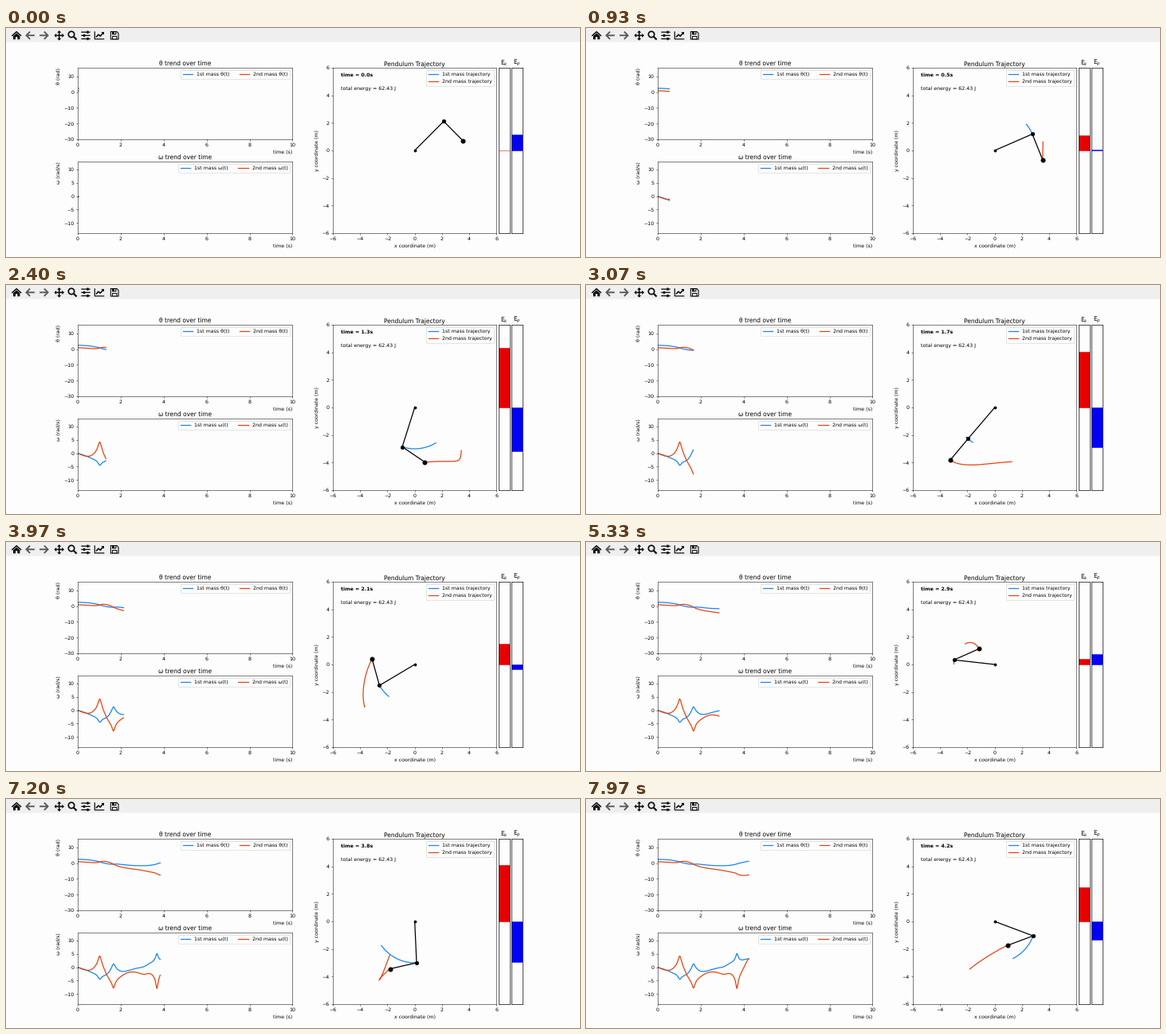
These frames come from a looping animation (720x288 px, 8 s). A matplotlib script:

```python
import numpy as np
import matplotlib.pyplot as plt
from matplotlib.animation import FuncAnimation
from matplotlib.patches import Circle, Polygon, Rectangle

W, H, DPI = 720, 288, 45
PX = 72 / DPI                      # points per pixel
FRAMES, LOOP = 241, 8000
BACK, BAR, INK, DIM = "#fdfdfe", "#efeff0", "#0a0a0a", "#585858"
BLUE, RED = "#1a84ee", "#e8430f"

plt.rcParams.update({"font.family": "DejaVu Sans", "font.size": 10,
                     "text.hinting": "none", "axes.facecolor": BACK,
                     "axes.titlepad": 5, "axes.labelpad": 5,
                     "xtick.major.pad": 4.2})

# Double pendulum
G, M1, M2, L1, L2 = 9.81, 2.0, 3.0, 3.0, 2.0
DT, T_START, T_STEP, T_END = 0.001, 0.046, 0.01755, 4.235
TRAIL1, TRAIL2 = 0.25, 0.40


def slope(s):
    a, b, u, v = s
    d = a - b
    sd, cd = np.sin(d), np.cos(d)
    den = 2 * M1 + M2 - M2 * np.cos(2 * d)
    du = (-G * (2 * M1 + M2) * np.sin(a) - M2 * G * np.sin(a - 2 * b)
          - 2 * sd * M2 * (v * v * L2 + u * u * L1 * cd)) / (L1 * den)
    dv = 2 * sd * (u * u * L1 * (M1 + M2) + G * (M1 + M2) * np.cos(a)
                   + v * v * L2 * M2 * cd) / (L2 * den)
    return np.array([u, v, du, dv])


def solve(start, steps):
    out = [np.array(start)]
    for _ in range(steps):
        s = out[-1]
        k1 = slope(s)
        k2 = slope(s + DT / 2 * k1)
        k3 = slope(s + DT / 2 * k2)
        k4 = slope(s + DT * k3)
        out.append(s + DT / 6 * (k1 + 2 * k2 + 2 * k3 + k4))
    return np.array(out).T


th1, th2, om1, om2 = solve([3 * np.pi / 4, np.pi / 4, 0, 0], 4300)
times = np.arange(len(th1)) * DT
x1, y1 = L1 * np.sin(th1), -L1 * np.cos(th1)
x2, y2 = x1 + L2 * np.sin(th2), y1 - L2 * np.cos(th2)
pot = G * (M1 * y1 + M2 * y2)
total = pot[0]
kin = total - pot

fig = plt.figure(figsize=(W / DPI, H / DPI), dpi=DPI, facecolor=BACK)


def panel(left, top, right, bottom):
    return fig.add_axes([left / W, 1 - bottom / H,
                         (right - left) / W, (bottom - top) / H])


def trend(top, bottom, name, unit, ylim, yticks):
    ax = panel(90, top, 359.4, bottom)
    ax.set(xlim=(0, 10), ylim=ylim, xticks=range(0, 11, 2), yticks=yticks)
    ax.set_title(f"{name} trend over time")
    ax.set_xlabel("time (s)", loc="right")
    ax.set_ylabel(f"{name} ({unit})", loc="top")
    lines = [ax.plot([], [], color=c, lw=2, label=f"{n} mass {name}(t)")[0]
             for n, c in (("1st", BLUE), ("2nd", RED))]
    ax.legend(loc="upper right", ncol=2)
    return lines


def gauge(left, right, name, color):
    ax = panel(left, 50, right, 258)
    ax.set(xlim=(0, 1), ylim=(-327, 327), xticks=[], yticks=[])
    ax.set_title(f"E$_{name}$")
    ax.spines[:].set_linewidth(1.1)
    return ax.add_patch(Rectangle((0, 0), 1, 0, fc=color, ec=color, lw=0.8))


ang = trend(50, 140, "θ", "rad", (-30, 15.4), range(-30, 11, 10))
vel = trend(168, 258, "ω", "rad/s", (-13.8, 13.0), range(-10, 11, 5))

ax = panel(410, 50, 615.4, 258)
ticks = range(-6, 7, 2)
ax.set(xlim=(-6, 6), ylim=(-6, 6), xticks=ticks, yticks=ticks,
       title="Pendulum Trajectory", xlabel="x coordinate (m)",
       ylabel="y coordinate (m)")
trail1, = ax.plot([], [], color=BLUE, lw=2, label="1st mass trajectory")
trail2, = ax.plot([], [], color=RED, lw=2, label="2nd mass trajectory")
ax.legend(loc="upper right")
rods, = ax.plot([], [], color="black", lw=2)
ax.plot(0, 0, "o", color="black", ms=5)
bob1, = ax.plot([], [], "o", color="black", ms=7.3)
bob2, = ax.plot([], [], "o", color="black", ms=8.5)
clock = ax.text(0.05, 0.947, "", weight="bold", transform=ax.transAxes)
ax.text(0.05, 0.867, f"total energy = {total:.2f} J", transform=ax.transAxes)

kin_bar = gauge(618, 632, "k", "#e60000")
pot_bar = gauge(634, 648, "p", "#0000f5")

# Toolbar, in pixel coordinates
tools = panel(0, 0, W, H)
tools.set(xlim=(0, W), ylim=(H, 0))
tools.axis("off")


def block(x, y, w, h, color=INK):
    tools.add_patch(Rectangle((x, y), w, h, color=color, lw=0, snap=False))


def stroke(points, width=1.4, color=INK):
    xs, ys = zip(*points)
    tools.plot(xs, ys, color=color, lw=width * PX, solid_capstyle="butt",
               solid_joinstyle="miter", snap=False)


def fill(points, color=INK):
    tools.add_patch(Polygon(points, fc=color, lw=0, snap=False))


def draw_home():
    stroke([(7.3, 10), (13.2, 4.8), (19.1, 10)], 1.5)
    fill([(9, 10.2), (13.2, 6.6), (17.4, 10.2), (17.4, 14.3), (14.4, 14.3),
          (14.4, 11.2), (12, 11.2), (12, 14.3), (9, 14.3)])


def draw_arrow(x, way):
    stroke([(x - 5.4 * way, 9.3), (x + 4.6 * way, 9.3)], 1.9, DIM)
    stroke([(x + 0.4 * way, 4.6), (x + 5 * way, 9.3), (x + 0.4 * way, 14)],
           1.9, DIM)


def draw_pan(x, y):
    for dx, dy in ((1, 0), (-1, 0), (0, 1), (0, -1)):
        stroke([(x, y), (x + 4.5 * dx, y + 4.5 * dy)], 1.6)
        base = x + 3.6 * dx, y + 3.6 * dy
        fill([(x + 6.3 * dx, y + 6.3 * dy),
              (base[0] + 2.6 * dy, base[1] + 2.6 * dx),
              (base[0] - 2.6 * dy, base[1] - 2.6 * dx)])


def draw_zoom():
    tools.add_patch(Circle((82, 8), 3.7, fill=False, ec=INK, lw=1.7 * PX))
    stroke([(84.6, 10.6), (88.6, 14.6)], 2.2)


def draw_sliders():
    for y, knob in ((5.2, 102.5), (9.4, 98), (13.6, 102.5)):
        stroke([(94.3, y), (105.7, y)], 1.3)
        block(knob - 1.2, y - 1.6, 2.4, 3.2)


def draw_chart():
    stroke([(111.3, 4.3), (111.3, 13.9), (123.3, 13.9)], 1.2)
    stroke([(113, 11.4), (116, 8.3), (118.2, 10.2), (121.8, 6.3)], 1.6)
    fill([(119.4, 5), (123, 5), (123, 8.6)])


def draw_save():
    fill([(130.8, 4), (139.2, 4), (141.6, 6.4), (141.6, 14.6), (130.8, 14.6)])
    fill([(131.9, 5.1), (138.8, 5.1), (140.5, 6.8), (140.5, 13.5),
          (131.9, 13.5)], BAR)
    block(133, 4.2, 5.4, 4.2)
    block(135.8, 5.1, 1.5, 2.3, BAR)
    block(133, 10, 6.4, 4.4)
    block(134, 11, 4.4, 2.5, BAR)


block(0, 0, W, 17.5, BAR)
draw_home()
draw_arrow(30.5, -1)
draw_arrow(47.5, 1)
draw_pan(66.7, 9.4)
draw_zoom()
draw_sliders()
draw_chart()
draw_save()


def update(n):
    t = min(T_START + T_STEP * n, T_END)
    i = int(round(t / DT))
    for line, data in zip(ang + vel, (th1, th2, om1, om2)):
        line.set_data(times[:i + 1:4], data[:i + 1:4])
    for line, x, y, span in ((trail1, x1, y1, TRAIL1),
                             (trail2, x2, y2, TRAIL2)):
        first = max(0, i - int(span / DT))
        line.set_data(x[first:i + 1], y[first:i + 1])
    rods.set_data([0, x1[i], x2[i]], [0, y1[i], y2[i]])
    bob1.set_data([x1[i]], [y1[i]])
    bob2.set_data([x2[i]], [y2[i]])
    kin_bar.set_height(kin[i])
    pot_bar.set_height(pot[i])
    clock.set_text(f"time = {t:.1f}s")
    return [*ang, *vel, trail1, trail2, rods, bob1, bob2, kin_bar, pot_bar,
            clock]


anim = FuncAnimation(fig, update, frames=FRAMES, interval=LOOP / FRAMES,
                     repeat=True, repeat_delay=0, blit=False)
plt.show()
```
